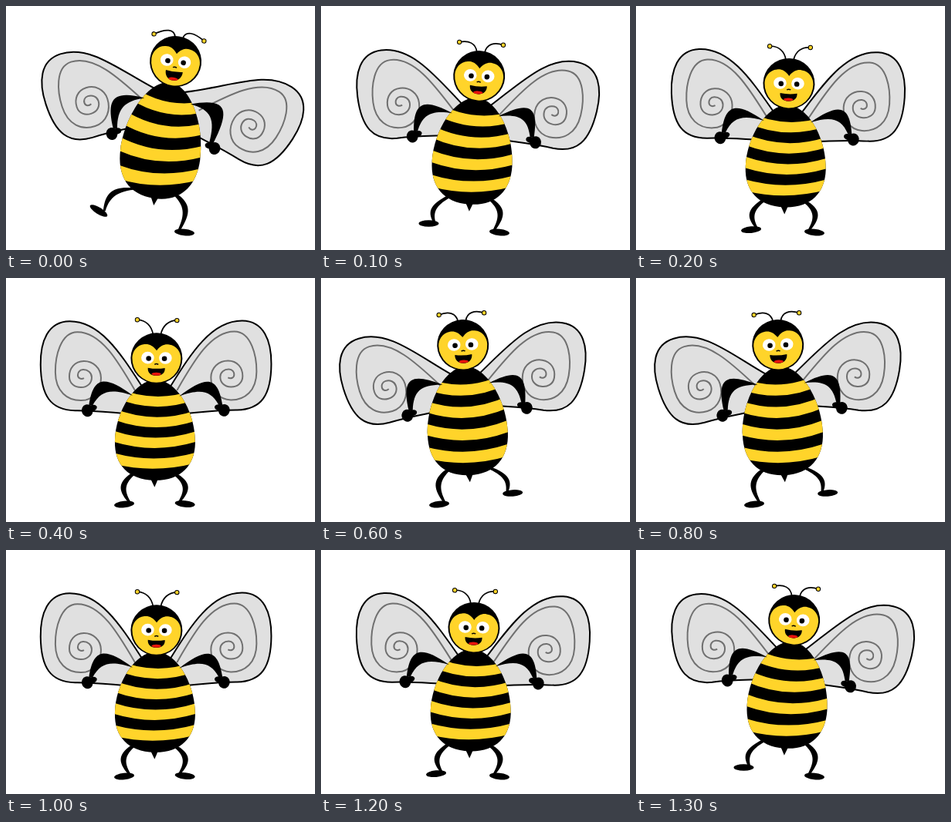
Write an HTML page with a canvas that moves like this. It is 400 px wide and 317 px high and loops after 1.4 s.

```html
<!DOCTYPE html>
<html lang="en">
<head>
<meta charset="utf-8">
<title>Dancing bee</title>
<style>
  html, body { margin: 0; width: 100%; height: 100%; overflow: hidden; background: #fff; }
  canvas { display: block; width: 400px; height: 317px; }
</style>
</head>
<body>
<canvas id="stage"></canvas>
<script>
const W = 400, H = 317, STEP = 100;
const BLACK = '#000', YELLOW = '#ffd42a', WING = '#e0e0e0', LINE = '#707070';
// Sway from right (1) to left (-1); the dance plays it forth and back.
const sway = [1, 0.41, 0.12, 0.03, -0.02, -0.2, -0.52, -0.95];
const COUNT = 2 * (sway.length - 1);

const canvas = document.getElementById('stage');
const ctx = canvas.getContext('2d');
const dpr = window.devicePixelRatio || 1;
canvas.width = W * dpr;
canvas.height = H * dpr;

const wingLine = new Path2D('M-68 20C-47-17-25-57 6-57C28-57 35-25 35-5C35 20 20 32 2 32' +
  'C-14 32-24 18-24 3C-24-10-14-19-2-19C10-19 17-10 17 1C17 10 10 15 2 15' +
  'C-7 15-12 9-12 2C-12-4-7-8-1-8C4-8 6-4 6-1C6 3 2 5-2 3');
const egg = new Path2D('M0-100C27-100 52-68 52-38C52-15 34 0 0 0C-34 0-52-15-52-38C-52-68-27-100 0-100Z');
const face = new Path2D('M0-10C-5-17-11-19-16-18C-26-17-31.5-8-31.5 0A31.5 31.5 0 0 0 31.5 0' +
  'C31.5-8 26-17 16-18C11-19 5-17 0-10Z');

const rad = a => a * Math.PI / 180;
const mix = (a, b, t) => a.map((v, i) => v + (b[i] - v) * t);

function turn(x, y, angle) {
  const c = Math.cos(rad(angle)), s = Math.sin(rad(angle));
  return [x * c - y * s, x * s + y * c];
}

function offset(x, y, angle, dx, dy) {
  const [u, v] = turn(dx, dy, angle);
  return [x + u, y + v];
}

function place(x, y, angle, draw) {
  ctx.save();
  ctx.translate(x, y);
  ctx.rotate(rad(angle));
  draw();
  ctx.restore();
}

function oval(x, y, rx, ry, fill, angle = 0) {
  ctx.beginPath();
  ctx.ellipse(x, y, rx, ry, rad(angle), 0, 2 * Math.PI);
  ctx.fillStyle = fill;
  ctx.fill();
}

// The sides mirror each other: q is the sway towards this side, lift its size.
function wing(side, q, lift, neck) {
  const x = 194.5 + side * (95 + 18 * q + 10 * lift);
  const y = 126.5 + 15.5 * q + 14 * lift;
  const angle = side * (25.5 * lift + 7.5 * q);
  const [rx, ry] = turn(neck[0] - x, neck[1] - y, -angle);
  place(x, y, angle, () => {
    ctx.scale(side, 1);
    ctx.beginPath();
    ctx.moveTo(rx * side, ry);
    ctx.bezierCurveTo(-50, -28, -24, -71, 16, -71);
    ctx.bezierCurveTo(44, -71, 54, -45, 54, -15);
    ctx.bezierCurveTo(54, 25, 42, 44, 10, 45);
    ctx.bezierCurveTo(-15, 45, -35, 48, -58, 50);
    ctx.closePath();
    ctx.lineWidth = 2;
    ctx.fillStyle = WING;
    ctx.fill();
    ctx.strokeStyle = BLACK;
    ctx.stroke();
    ctx.strokeStyle = LINE;
    ctx.stroke(wingLine);
  });
}

// Crescent limb, bent around a corner point and thickest at the bend.
function limb(from, bend, to, tip, root, bulk) {
  const inner = mix(bend, mix(from, to, 0.5), bulk);
  const back = [to[0] + tip, to[1] - 1];
  const start = [from[0] + root, from[1] + Math.abs(root) / 2];
  ctx.beginPath();
  ctx.moveTo(...from);
  ctx.bezierCurveTo(...mix(from, bend, 0.75), ...mix(to, bend, 0.75), ...to);
  ctx.lineTo(...back);
  ctx.bezierCurveTo(...mix(back, inner, 0.75), ...mix(start, inner, 0.75), ...start);
  ctx.closePath();
  ctx.fillStyle = BLACK;
  ctx.fill();
}

function leg(side, q, lift, hip) {
  const kick = Math.max(0, -q), bent = kick * kick;
  const knee = [192 + side * (53 + 10 * kick), 269 - 8 * lift - 28 * bent];
  const foot = [192 + side * (39 + 33 * kick), 294 - 28 * kick];
  const angle = side * (6 - 38 * bent);
  const ankle = offset(...foot, angle, side * -5.5, -2);
  limb(hip, knee, ankle, -3 * side, -4 * side, 0.45);
  oval(...foot, 13, 4.3, BLACK, angle);
}

function arm(side, q, lift, shoulder) {
  const elbow = [194 + side * (79 + 8 * lift + 19 * q), 116 - 4.5 * lift + 5.5 * q];
  const x = 194 + side * (87 - 22.5 * lift + 9.5 * q);
  const y = 166 + 3.5 * lift + 9.5 * q;
  limb(shoulder, elbow, [x, y], -5 * side, 0, 0.55);
  oval(x + 2 * side, y + 6, 7.3, 8, BLACK, 15 * side);
  oval(x - 5 * side, y + 2.5, 5.5, 4, BLACK, 15 * side);
}

function body(x, y, height, lean) {
  place(x, y, lean, () => {
    ctx.fillStyle = BLACK;
    ctx.beginPath();
    ctx.moveTo(-5, -2);
    ctx.lineTo(5, -2);
    ctx.lineTo(0.5, 9);
    ctx.fill();
    ctx.scale(1, height / 100);
    ctx.fill(egg);
    ctx.clip(egg);
    ctx.fillStyle = YELLOW;
    for (let i = 0; i < 4; i++) {
      const top = 0.165 + i * 0.206, bottom = top + 0.102;
      const edge = f => {
        const mid = 100 * f - 100, sag = 10 - 5 * f, tilt = (f - 0.5) * lean + f;
        return { left: mid - sag + tilt, right: mid - sag - tilt, pull: mid + sag };
      };
      const a = edge(top), b = edge(bottom);
      ctx.beginPath();
      ctx.moveTo(-55, a.left);
      ctx.quadraticCurveTo(0, a.pull, 55, a.right);
      ctx.lineTo(55, b.right);
      ctx.quadraticCurveTo(0, b.pull, -55, b.left);
      ctx.fill();
    }
  });
}

function antenna(side, lift) {
  const x = side * (25.5 + 7.2 * lift), y = -50 + 18.5 * lift;
  ctx.beginPath();
  ctx.moveTo(side * 5, -31);
  ctx.bezierCurveTo(side * 7, -42, x * 0.58, y - 9 * lift, x, y);
  ctx.lineWidth = 1.7;
  ctx.strokeStyle = BLACK;
  ctx.stroke();
  oval(x, y, 3.2, 3.2, BLACK);
  oval(x, y, 2.2, 2.2, YELLOW);
}

function head(x, y, tilt, lift) {
  const chin = 22.5 + 2.5 * lift;
  place(x, y, tilt, () => {
    antenna(-1, lift);
    antenna(1, lift);
    oval(0, 0, 33.5, 33, BLACK);
    ctx.fillStyle = YELLOW;
    ctx.fill(face);
    for (const side of [-1, 1]) {
      oval(side * 11.5, -0.5, 8.3, 7.8, '#fff');
      oval(side * 10.2, 0.3, 3.3, 3.3, BLACK);
    }
    ctx.beginPath();
    ctx.moveTo(-2.5, 8);
    ctx.quadraticCurveTo(0, 6.5, 2.5, 8);
    ctx.lineWidth = 1.5;
    ctx.strokeStyle = BLACK;
    ctx.stroke();
    ctx.beginPath();
    ctx.moveTo(-11, 12.5);
    ctx.quadraticCurveTo(0, 14.5, 11, 12.5);
    ctx.bezierCurveTo(11.5, 19, 7, chin, 0, chin);
    ctx.bezierCurveTo(-7, chin, -11.5, 19, -11, 12.5);
    ctx.fillStyle = BLACK;
    ctx.fill();
    oval(0, chin - 2.2, 6.2, 2, '#e8140c');
  });
}

function draw(s) {
  const lift = Math.abs(s);
  const x = 192, y = 263 - 13 * lift, height = 130 + 22 * lift, lean = 1.2 + 6.5 * s;
  const joint = (dx, dy) => offset(x, y, lean, dx, dy);
  const both = (part, dx, dy) => {
    for (const side of [-1, 1]) part(side, side * s, lift, joint(side * dx, dy));
  };
  ctx.setTransform(dpr, 0, 0, dpr, 0, 0);
  ctx.fillStyle = '#fff';
  ctx.fillRect(0, 0, W, H);
  both(wing, 18, -0.93 * height);
  both(leg, 28, -10);
  body(x, y, height, lean);
  both(arm, 30, -0.84 * height);
  head(...joint(3.5 * s, -height - 28), 1 + 7 * s, lift);
}

let shown = -1;
const begin = performance.now();
function tick(now) {
  const step = Math.floor(Math.max(0, now - begin) / STEP) % COUNT;
  const k = Math.min(step, COUNT - step);
  if (k !== shown) {
    draw(sway[k]);
    shown = k;
  }
  requestAnimationFrame(tick);
}
tick(begin);
</script>
</body>
</html>
```
